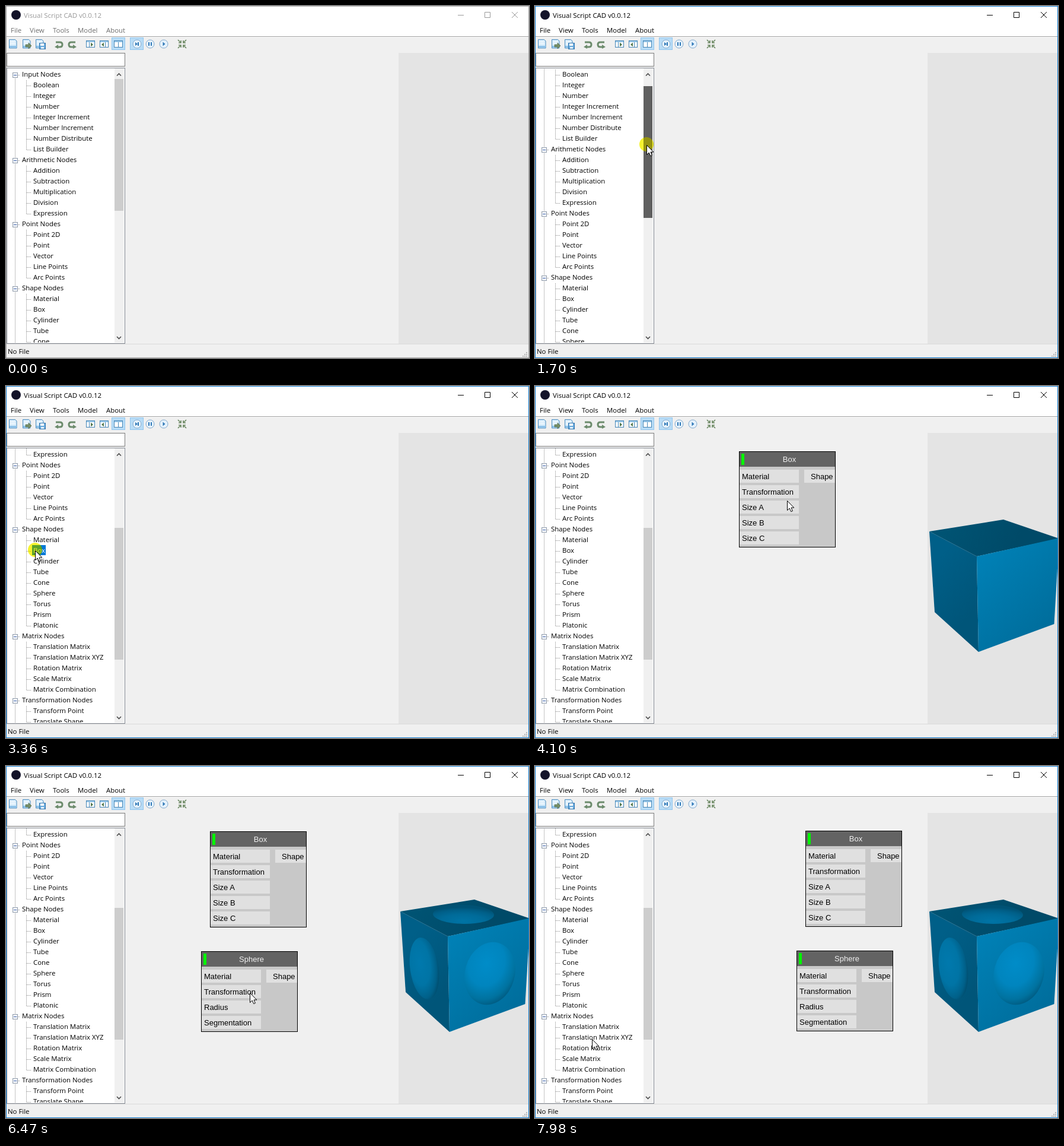
An HTML page for the animation above (8 s loop, 882x593 px).

```html
<!DOCTYPE html>
<html lang="en">
<head>
<meta charset="utf-8">
<title>Visual Script CAD</title>
<style>
html, body { margin: 0; width: 100%; height: 100%; overflow: hidden; background: #f0f0f0; }
svg { display: block; width: 100vw; height: 100vh; }
text { font: 11.4px "Open Sans", "Noto Sans", sans-serif; white-space: pre; }
rect { shape-rendering: crispEdges; }
.node text { font: 13px "Liberation Sans", Arial, sans-serif; }
.dot { stroke: #8a8a8a; stroke-dasharray: 1 1; shape-rendering: crispEdges; }
.win { --ink: #000; --menu: #000; --edge: #1883d7; }
.win.idle { --ink: #999; --menu: #6d6d6d; --edge: #aaa; }
.ink { fill: var(--ink); }
.menu { fill: var(--menu); }
.btn { stroke: var(--ink); fill: none; }
.edge { stroke: var(--edge); fill: none; }
.green { fill: none; stroke: #6c8b6c; stroke-width: 3; }
</style>
</head>
<body>
<svg id="app" class="win idle" viewBox="0 0 882 593"></svg>
<script>
const LOOP = 8000, ROW = 18, THUMB_TOP = 123, PRESS_Y = 221;

const rect = (x, y, w, h, fill, extra = '') =>
  `<rect x="${x}" y="${y}" width="${w}" height="${h}" fill="${fill}" ${extra}/>`;
const box = (x, y, w, h, fill, line) =>
  rect(x + .5, y + .5, w - 1, h - 1, fill, `stroke="${line}"`);
const label = (x, y, str, extra = '') => `<text x="${x}" y="${y}" ${extra}>${str}</text>`;
const path = (d, extra) => `<path d="${d}" ${extra}/>`;
const at = (x, y, body) => `<g transform="translate(${x} ${y})">${body}</g>`;

const TREE = [
  ['Input Nodes', 'Boolean,Integer,Number,Integer Increment,Number Increment,Number Distribute,List Builder'],
  ['Arithmetic Nodes', 'Addition,Subtraction,Multiplication,Division,Expression'],
  ['Point Nodes', 'Point 2D,Point,Vector,Line Points,Arc Points'],
  ['Shape Nodes', 'Material,Box,Cylinder,Tube,Cone,Sphere,Torus,Prism,Platonic'],
  ['Matrix Nodes', 'Translation Matrix,Translation Matrix XYZ,Rotation Matrix,Scale Matrix,Matrix Combination'],
  ['Transformation Nodes', 'Transform Point,Translate Shape']
];

function tree() {
  let row = 0, lines = path('M15.5 116V810', 'class="dot"'), out = '';
  for (const [head, list] of TREE) {
    const items = list.split(','), y = 115 + row * ROW;
    const end = y + items.length * ROW + 1 + (head[0] === 'T' ? 40 : 0);
    lines += path(`M20 ${y + 1.5}h4M34.5 ${y + 10}V${end}`, 'class="dot"');
    out += box(11, y - 3, 9, 9, '#f4f7fb', '#8f9aa8') + rect(13, y + 1, 5, 1, '#3b5fa8') +
      label(27, y + 4, head);
    items.forEach((name, i) => {
      const c = y + (i + 1) * ROW;
      lines += path(`M35 ${c + 1.5}h8`, 'class="dot"');
      if (name === 'Box' || name === 'Sphere')
        out += rect(44, c - 6, name === 'Box' ? 23 : 41, 17, '#0078d7', `id="bg${name}" transform="translate(0 -3)"`);
      out += label(46, c + 4, name, `id="it${name.replace(/ /g, '')}"`);
    });
    row += items.length + 1;
  }
  return lines + out;
}

function node(id, x, y, title, inputs) {
  const h = 32 + inputs.length * 26;
  const slots = inputs.map((name, i) =>
    rect(1, 31 + i * 26, 100, 22, '#e0e0e0') + label(5, 47 + i * 26, name)).join('');
  return `<g id="${id}" class="node">` + at(x, y,
    box(0, 0, 163, h, '#c8c8c8', '#000') + rect(1, 1, 161, 25, '#636363') +
    rect(4, 4, 5, 19, '#00f500') +
    label(85, 18, title, 'fill="#f0f0f0" text-anchor="middle"') + slots +
    rect(110, 31, 52, 22, '#e0e0e0') + label(121, 47, 'Shape')) + '</g>';
}

const page = (x, y) =>
  path(`M${x + .5} ${y + .5}h10l2.5 2.5v12h-12.5z`, 'fill="#d9edfb" stroke="#4a8cc0"') +
  path(`M${x + 2} ${y + 4.5}h8M${x + 2} ${y + 7.5}h9`, 'stroke="#fff"') +
  rect(x + 1, y + 11, 12, 3, '#8fc3ea');
const panel = (x, mark) =>
  box(x, 58, 15, 12, '#fff', '#4585b5') + rect(x + 1, 59, 13, 2, '#9cc9ea') + mark;
const disc = (x, mark) =>
  `<circle cx="${x}" cy="64" r="7" fill="#e6f2fc" stroke="#82a9cd"/>` + path(mark, 'fill="#2f78b7"');
const turn = 'M-5 -4H2Q6 -4 6 0T2 4H-3';

function toolbar() {
  const corner = path('M-7 -7l4 4M-2 -6v4h-4', 'fill="none" stroke="#6f8b66" stroke-width="1.7"');
  return page(5, 56) + page(28, 56) +
    path('M33 65h5v-3l5 5-5 5v-3h-5z', 'fill="#788f66" stroke="#50674a" stroke-width=".7"') +
    page(50, 56) + box(56, 62, 11, 11, '#67a9dc', '#3577ae') + rect(58, 63, 6, 4, '#fff') + rect(59, 69, 5, 3, '#e4f1fb') +
    at(89, 65, path(turn, 'class="green"') + path('M-7 4l6 -4v7z', 'fill="#6c8b6c"')) +
    at(112, 65, `<g transform="scale(-1 1)">${path(turn, 'class="green"') + path('M-7 4l6 -4v7z', 'fill="#6c8b6c"')}</g>`) +
    box(178, 53, 23, 21, '#b8dcf6', '#90c5ee') + box(209, 53, 23, 21, '#b8dcf6', '#90c5ee') +
    panel(135, rect(140, 61, 1, 8, '#4585b5') + path('M143 61.5l4 3.5-4 3.5z', 'fill="#54784f"')) +
    panel(158, rect(167, 61, 1, 8, '#4585b5') + path('M165 61.5l-4 3.5 4 3.5z', 'fill="#54784f"')) +
    panel(182, rect(189, 61, 1, 8, '#4585b5')) +
    disc(221, 'M218 61l4 3-4 3zM222 61h2v6h-2z') +
    disc(243, 'M240 61h2v6h-2zM244 61h2v6h-2z') +
    disc(266, 'M264.5 60.5l4 3.5-4 3.5z') +
    at(297, 64, [0, 90, 180, 270].map(a => `<g transform="rotate(${a})">${corner}</g>`).join(''));
}

function grad(id, x1, y1, x2, y2, a, b) {
  return `<linearGradient id="${id}" gradientUnits="userSpaceOnUse" x1="${x1}" y1="${y1}" x2="${x2}" y2="${y2}">` +
    `<stop stop-color="${a}"/><stop offset="1" stop-color="${b}"/></linearGradient>`;
}
function ball(id, fx, fy, cols) {
  return `<radialGradient id="${id}" cx="${fx}" cy="${fy}" r=".72">` +
    cols.map((c, i) => `<stop offset="${[0, .5, .8, 1][i]}" stop-color="${c}"/>`).join('') + '</radialGradient>';
}
const bulge = (x, y, rx, ry, turn, fill) =>
  `<ellipse cx="${x}" cy="${y}" rx="${rx}" ry="${ry}" transform="rotate(${turn} ${x} ${y})" fill="url(#${fill})"/>`;

const defs = '<defs><clipPath id="list"><rect x="2" y="105" width="181" height="462"/></clipPath>' +
  '<clipPath id="view"><rect x="662" y="79" width="219" height="490"/></clipPath>' +
  grad('top', 700, 230, 800, 285, '#005373', '#004a68') +
  grad('left', 670, 300, 748, 370, '#005f88', '#005579') +
  grad('right', 750, 295, 870, 420, '#0080b5', '#006c9a') +
  ball('ballTop', .5, .85, ['#0074a5', '#006b99', '#005f88', '#005275']) +
  ball('ballLeft', .36, .4, ['#0079ad', '#0074a5', '#006089', '#004562']) +
  ball('ballRight', .38, .36, ['#008cc8', '#0085be', '#00729f', '#00557a']) + '</defs>';

const cube = '<g id="cube">' +
  path('M665 245L790 225L884 257L745 287Z', 'fill="url(#top)"') +
  path('M665 245L745 287L748 448L674 381Z', 'fill="url(#left)"') +
  path('M745 287L884 256L875.5 401L748 448Z', 'fill="url(#right)"') + '</g>';
const bulges = '<g id="bulges">' + bulge(771.5, 250, 51.5, 16, 1, 'ballTop') +
  bulge(705.5, 341, 24, 52.5, -8, 'ballLeft') + bulge(816, 349.5, 42, 53.5, 16, 'ballRight') + '</g>';

const menus = [['File', 8], ['View', 40], ['Tools', 79], ['Model', 121], ['About', 169]];
let grip = '';
for (let i = 0; i < 3; i++)
  for (let j = 0; j <= i; j++) grip += rect(877 - j * 3, 583 + i * 3, 2, 2, '#b8b8b8');

const app = document.getElementById('app');
app.innerHTML = defs + rect(0, 0, 882, 593, '#f0f0f0') +
  rect(0, 0, 882, 51, '#fff') + rect(0, 51, 882, 1, '#a0a0a0') + rect(0, 52, 882, 1, '#fff') +
  '<circle cx="17" cy="15" r="8" fill="#14142a"/>' +
  label(30, 20, 'Visual Script CAD v0.0.12', 'class="ink"') +
  menus.map(([name, x]) => label(x, 45, name, 'class="menu"')).join('') +
  path('M762 15.5h10M807.5 10.5h9v9h-9zM853 10l10 10M863 10l-10 10', 'class="btn"') +
  toolbar() +
  rect(662, 79, 220, 490, '#e4e4e4') + `<g clip-path="url(#view)">${cube + bulges}</g>` +
  box(1, 79, 200, 23, '#fff', '#7a7a7a') + box(1, 104, 200, 465, '#fff', '#828790') +
  `<g clip-path="url(#list)"><g id="tree">${tree()}</g></g>` +
  rect(183, 105, 16, 462, '#f0f0f0') + rect(183, THUMB_TOP, 15, 222, '#cdcdcd', 'id="thumb"') +
  path('M187 117.5l3.5 -3.5l3.5 3.5M187 557l3.5 3.5l3.5 -3.5', 'fill="none" stroke="#505050" stroke-width="1.7"') +
  rect(0, 569, 882, 1, '#d9d9d9') + label(3, 586, 'No File') + grip +
  node('box', 344, 110, 'Box', ['Material', 'Transformation', 'Size A', 'Size B', 'Size C']) +
  node('sphere', 329, 312, 'Sphere', ['Material', 'Transformation', 'Radius', 'Segmentation']) +
  '<rect class="edge" x=".5" y=".5" width="881" height="592"/>' +
  '<g id="halo"><circle r="12" fill="#ffff50" style="mix-blend-mode:multiply"/><circle r="12" fill="#e6e100" opacity=".4"/></g>' +
  '<g id="mouse">' +
  path('M.5 .5V16.5L4.2 13L6.8 18.6L9.4 17.5L7 12H11.8Z', 'fill="#fff" stroke="#000"') + '</g>';

// Pointer stops: time, x, y
const STOPS = [
  [580, 663, 559], [1230, 163, 244], [1370, 187, 225], [1420, 188, PRESS_Y], [1560, 188, PRESS_Y],
  [1700, 188, 233], [2210, 187, 337], [2340, 187, 337], [2800, 43, 275], [2980, 43, 275],
  [3030, 41, 275], [3180, 41, 275], [3300, 49, 276], [3370, 49, 276], [3870, 425, 192],
  [4300, 425, 192], [5060, 55, 337], [5095, 55, 337], [5150, 55, 345], [5270, 55, 360],
  [5420, 55, 360], [5520, 56, 348], [5620, 56, 348], [6090, 409, 386], [6190, 411, 381],
  [6770, 411, 381], [6950, 401, 496], [7100, 401, 496], [7400, 513, 495], [7870, 96, 460],
  [7980, 96, 459]
];
function pointer(t) {
  const n = STOPS.findIndex(s => s[0] > t);
  if (n < 1) return n ? STOPS[STOPS.length - 1].slice(1) : STOPS[0].slice(1);
  const [a, x, y] = STOPS[n - 1], [b, u, v] = STOPS[n];
  const k = (t - a) / (b - a), e = k * k * (3 - 2 * k);
  return [Math.round(x + (u - x) * e), Math.round(y + (v - y) * e)];
}

const el = {};
for (const e of app.querySelectorAll('[id]')) el[e.id] = e;
const show = (e, on) => { e.style.display = on ? '' : 'none'; };
const move = (e, x, y) => e.setAttribute('transform', `translate(${x} ${y})`);
const within = (t, a, b) => t >= a && t < b;

function pick(name, on) {
  show(el['bg' + name], on);
  el['it' + name].setAttribute('fill', on ? '#fff' : '#000');
}

function draw(t) {
  const [x, y] = pointer(t);
  app.classList.toggle('idle', t < 1420);

  const drag = t < 1420 ? 0 : t < 2340 ? Math.max(0, y - PRESS_Y) : 116;
  el.thumb.setAttribute('y', THUMB_TOP + drag);
  el.thumb.setAttribute('fill', within(t, 1420, 2390) ? '#606060' : '#cdcdcd');
  move(el.tree, 0, -ROW * Math.floor(drag / 8.9));

  pick('Box', within(t, 3230, 3410));
  pick('Sphere', within(t, 5520, 5670));
  show(el.box, t >= 4100);
  show(el.cube, t >= 4100);
  show(el.sphere, t >= 6470);
  show(el.bulges, t >= 6470);

  const pan = t < 7100 ? 0 : t < 7400 ? x - 401 : 112;
  for (const n of [el.box, el.sphere]) move(n, pan, -Math.round(pan / 112));

  show(el.mouse, t >= 580);
  move(el.mouse, x, y + 1);
  show(el.halo, within(t, 1420, 2340) || within(t, 3230, 4100) || within(t, 5520, 6240));
  move(el.halo, x, y);
}

const start = performance.now();
function tick() {
  draw((performance.now() - start) % LOOP);
  requestAnimationFrame(tick);
}
draw(0);
requestAnimationFrame(tick);
</script>
</body>
</html>
```
